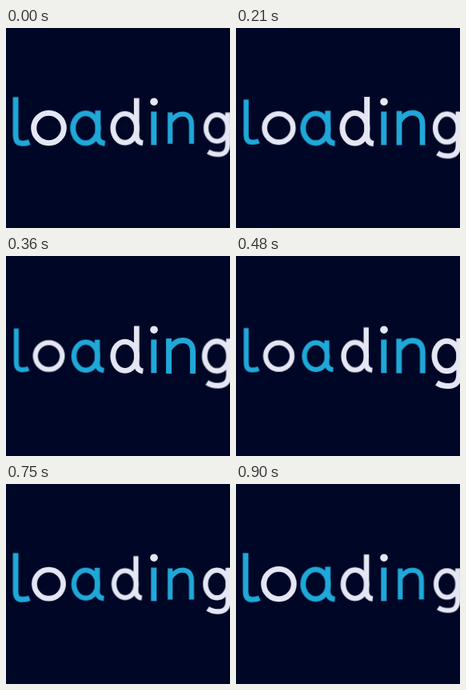
Write an HTML page that moves like this. It is 280x250 px and loops after 930 ms.

```html
<!DOCTYPE html>
<html lang="en">
<head>
<meta charset="utf-8">
<title>loading</title>
<style>
html, body { margin: 0; width: 100%; height: 100%; overflow: hidden; background: #000626; }
svg { display: block; width: 280px; height: 250px; fill: none; stroke: #e4e6f3; stroke-width: 7; }
.blue { stroke: #1fa8d8; }
.dot { fill: #e4e6f3; stroke: none; }
g { transform-origin: var(--x) 125px;
    animation: breathe 465ms cubic-bezier(.37, 0, .63, 1) calc(var(--i) * 93ms - 1023ms) infinite alternate; }
@keyframes breathe { from { transform: scale(1); } to { transform: scale(.88); } }
</style>
</head>
<body>
<svg viewBox="0 0 280 250" role="img" aria-label="loading">
  <g class="blue" style="--i:0; --x:19px">
    <path d="M12 86V134C12 141.500 14.500 144.500 20.500 144.500Q25.500 144.500 29.500 142.800"/>
  </g>
  <g style="--i:1; --x:53.5px">
    <circle cx="53.500" cy="125" r="18.800"/>
  </g>
  <g class="blue" style="--i:2; --x:102px">
    <ellipse cx="99.500" cy="125.200" rx="16" ry="18.800"/>
    <path d="M115 103V135Q115 143.500 124 144.500"/>
  </g>
  <g style="--i:3; --x:151.5px">
    <ellipse cx="148.500" cy="125.200" rx="15.500" ry="18.800"/>
    <path d="M163.700 86V135Q163.700 143.500 172 144.500"/>
  </g>
  <path class="blue" d="M184.800 104.500V146.300"/>
  <circle class="dot" cx="185" cy="92.200" r="4.800"/>
  <g class="blue" style="--i:5; --x:218.5px">
    <path d="M203.500 147V103M203.500 117C208.500 109 214.500 105.500 220.500 105.500C229.500 105.500 233.500 111 233.500 120V147"/>
  </g>
  <g style="--i:6; --x:265px">
    <ellipse cx="263.500" cy="125" rx="15.500" ry="18.800"/>
    <path d="M278.800 103V147C278.800 158 274 162.500 265 162.500Q257 162.500 251 158.500"/>
  </g>
</svg>
</body>
</html>
```
